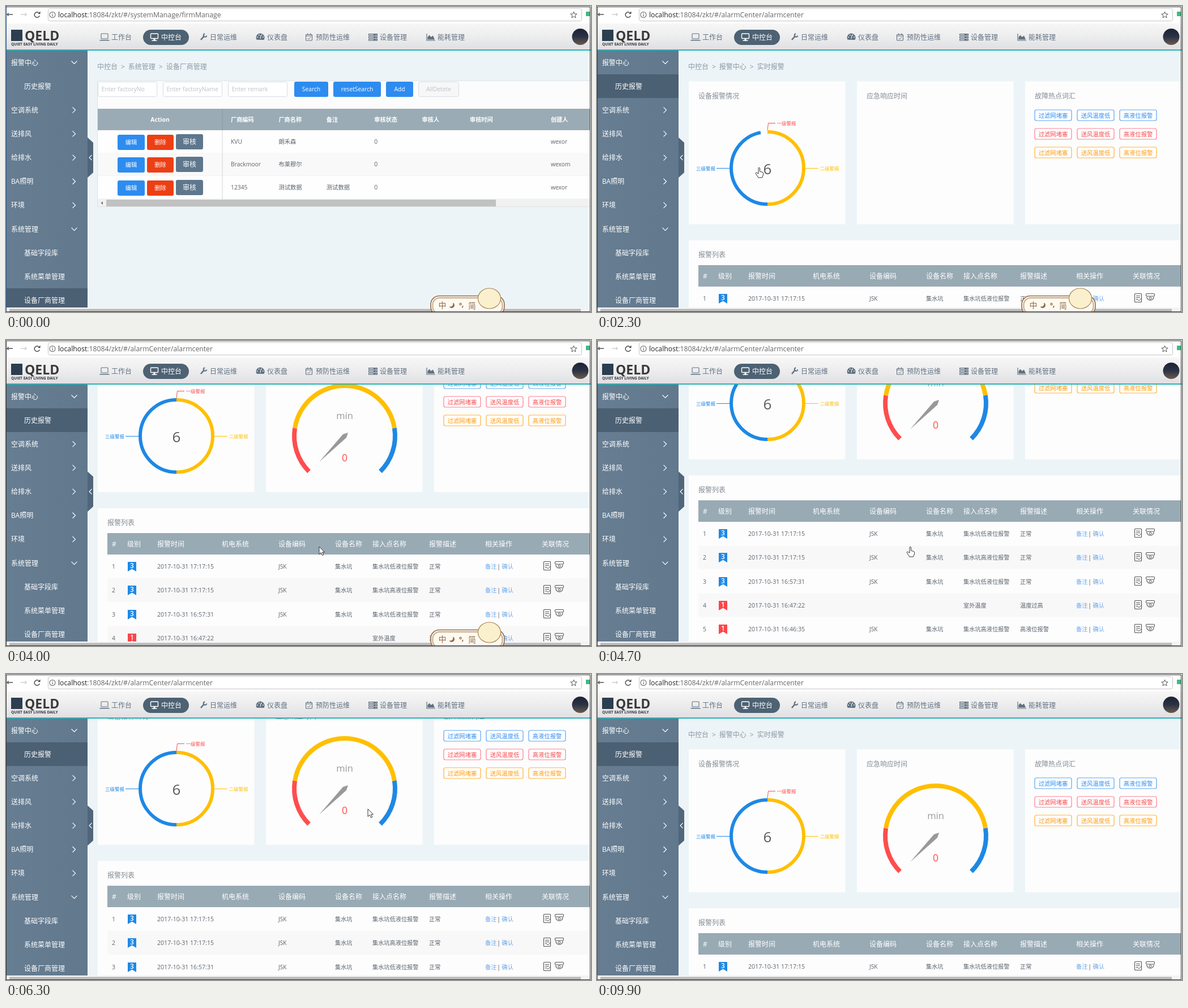
Animation, 1033 px wide and 542 px high, one loop 10 s. Source, as an HTML page with a canvas:

```html
<!DOCTYPE html>
<html lang="zh-CN">
<head>
<meta charset="utf-8">
<style>
html, body { margin: 0; width: 100%; height: 100%; overflow: hidden; background: #fff; }
canvas { display: block; width: 1033px; height: 542px; }
</style>
</head>
<body>
<canvas id="stage" width="1033" height="542"></canvas>
<script>
const c = document.getElementById('stage').getContext('2d');
const FONT = '"Open Sans","Noto Sans CJK SC","Noto Sans CJK",sans-serif';
const BLUE = '#2d8cf0', RED = '#ed3f14', SLATE = '#5f778d', GOLD = '#ffbf00', AZURE = '#1e88e5', ROSE = '#ff4d4f';
const INK = '#5b646e', SOFT = '#838b93', NAV = '#607080';
const LOOP = 10000;

// ---------- helpers ----------
// y is the visual middle of the line
function text(s, x, y, size, color, align = 'left', weight = 400) {
  c.font = `${weight} ${size}px ${FONT}`;
  c.textAlign = align;
  c.fillStyle = color;
  c.fillText(s, x, Math.round(y + size * .38));
}
function rect(x, y, w, h, color) {
  c.fillStyle = color;
  c.fillRect(x, y, w, h);
}
function round(x, y, w, h, r, fill, stroke, lw = 1) {
  c.beginPath();
  c.roundRect(x, y, w, h, r);
  if (fill) { c.fillStyle = fill; c.fill(); }
  if (stroke) { c.strokeStyle = stroke; c.lineWidth = lw; c.stroke(); }
}
function trace(p) {
  c.beginPath();
  for (let i = 0; i < p.length; i += 2) c.lineTo(p[i], p[i + 1]);
}
function line(color, lw, ...p) {
  trace(p);
  c.strokeStyle = color;
  c.lineWidth = lw;
  c.stroke();
}
function poly(fill, ...p) {
  trace(p);
  c.fillStyle = fill;
  c.fill();
}
function arc(x, y, r, a, b, color, lw) {
  c.beginPath();
  c.arc(x, y, r, a, b);
  c.strokeStyle = color;
  c.lineWidth = lw;
  c.stroke();
}
function disc(x, y, r, color) {
  c.beginPath();
  c.arc(x, y, r, 0, 7);
  c.fillStyle = color;
  c.fill();
}
// corner arrow: (dx, dy) points the way it opens towards
function chevron(x, y, dx, dy, color, lw) {
  line(color, lw, x - dx - dy, y - dy - dx, x, y, x - dx + dy, y - dy + dx);
}
function fade(x0, y0, x1, y1, ...colors) {
  const g = c.createLinearGradient(x0, y0, x1, y1);
  colors.forEach((k, i) => g.addColorStop(i / (colors.length - 1), k));
  return g;
}
const ramp = (t, a, b) => Math.max(0, Math.min(1, (t - a) / (b - a)));
const smooth = p => p * p * (3 - 2 * p);

// ---------- motion ----------
const NOTCH = 84.3;
// start, end, wheel notches
const scrolls = [[3690, 4180, 2], [4660, 4900, 1], [5060, 5300, 1], [5950, 6300, -3], [7050, 7400, -1]];
const scrollAt = t => Math.round(scrolls.reduce((s, [a, b, n]) => s + n * NOTCH * smooth(ramp(t, a, b)), 0));

// start, end, destination
const moves = [
  [100, 600, 40, 145], [1200, 1800, 335, 225], [1800, 2000, 286, 286], [2300, 2700, 511, 329],
  [3000, 3400, 553, 336], [3700, 4000, 553, 366], [5200, 5400, 549, 350], [6000, 6300, 639, 239],
  [6300, 6700, 60, 90], [6700, 7000, 300, 200], [7400, 7800, 154, 188], [7800, 8000, 420, 43],
  [8000, 8500, 800, 205], [8500, 8800, 978, 200], [8800, 9100, 940, 100]
];

function pointerAt(t) {
  let x = 845, y = 18;
  for (const [a, b, tx, ty] of moves) {
    const p = ramp(t, a, b);
    x += (tx - x) * p;
    y += (ty - y) * p;
  }
  return [Math.round(x), Math.round(y)];
}

function cursor(t) {
  if (t < 100 || t >= 9100) return;
  const [x, y] = pointerAt(t), top = scrollAt(t);
  const onMenu = x < 144 && y > 79;
  const onRing = t > 1900 && Math.hypot(x - 301, y + top - 287) < 67;
  const onRows = t > 1500 && x > 179 && y + top > 497;
  const hand = onMenu || onRing || onRows;
  c.save();
  c.translate(x, y);
  const shape = new Path2D(hand
    ? 'M-1 1Q0-1 1.5 1V7L5 8L7 9Q8 10 7.5 13L5.5 18H-1L-5 12Q-7 9-4.5 9L-1 11Z'
    : 'M0 0V13.5L3.2 10.6L5.5 15.5L7.8 14.5L5.6 9.8H9.5Z');
  c.fillStyle = '#fff';
  c.fill(shape);
  c.strokeStyle = '#333';
  c.lineWidth = 1;
  c.stroke(shape);
  c.restore();
}

// ---------- browser bar ----------
function browser(t) {
  rect(0, 0, 1033, 31, '#fff');
  line('#444', 1.4, 2, 15, 12, 15);
  chevron(2, 15, -2.5, 0, '#444', 1.4);
  line('#ccc', 1.4, 26, 15, 36, 15);
  chevron(36, 15, 2.5, 0, '#ccc', 1.4);
  arc(55, 15.5, 4.7, .4, 5.3, '#444', 1.5);
  poly('#444', 56, 14, 60.5, 14, 60.5, 9.5);
  round(74.5, 4.5, 942, 22, 3, '#fff', '#c4c4c4');
  arc(82, 15.5, 5, 0, 7, '#666', 1.1);
  rect(81.5, 14.5, 1.2, 4, '#666');
  rect(81.5, 12, 1.2, 1.3, '#666');
  text('localhost', 92, 15.5, 12.25, '#222');
  const w = c.measureText('localhost').width;
  text(':18084/zkt/#/' + (t < 800 ? 'systemManage/firmManage' : 'alarmCenter/alarmcenter'), 92 + w, 15.5, 12.25, '#666');
  const star = [];
  for (let i = 0; i <= 10; i++) {
    const r = i % 2 ? 2.6 : 6, a = i * Math.PI / 5 - Math.PI / 2;
    star.push(1002.5 + r * Math.cos(a), 16 + r * Math.sin(a));
  }
  line('#555', 1, ...star);
  rect(1024, 10, 8, 8, '#41b883');
}

// ---------- top navigation ----------
// each icon is drawn around its own centre
const icons = {
  laptop(k) { round(-6, -6, 12, 9, 1, null, k, 1.1); rect(-8.5, 5, 17, 1.5, k); },
  screen(k) { round(-6.5, -6, 13, 8.5, 1, null, k, 1.4); rect(-1.5, 3, 3, 3, k); rect(-4.5, 5.5, 9, 1.5, k); },
  wrench(k) { line(k, 2.6, -4, 5, 2, -2); arc(3.5, -3, 2.8, .1, 4.6, k, 2); },
  dial(k) {
    c.beginPath(); c.arc(0, 1, 7.5, 2.6, 6.83); c.fillStyle = k; c.fill();
    for (let a = 3.3; a < 6.2; a += .93) disc(5 * Math.cos(a), 1 + 5 * Math.sin(a), 1, '#eee');
    line('#eee', 1.2, 0, 3, 1, -3);
  },
  calendar(k) {
    round(-5.5, -4.5, 11, 10.5, 1, null, k, 1.1); rect(-5, -2.5, 10, 1, k);
    rect(-3, -6.5, 1.3, 3, k); rect(2, -6.5, 1.3, 3, k); line(k, 1, -2.5, 2, -.5, 4, 3, 0);
  },
  server(k) {
    for (let y = -6; y < 6; y += 4.5) { rect(-8, y, 16, 3.6, k); rect(-7, y + 1.2, 8, 1.2, '#eee'); disc(5.5, y + 1.8, .8, '#eee'); }
  },
  chart(k) { line(k, 1.2, -7, -6, -7, 6, 8, 6); poly(k, -5.5, 4.5, -5.5, 0, -2.5, -3.5, .5, 0, 4, -2.5, 7, 4.5); }
};
const nav = [['工作台', 186, 'laptop'], ['中控台', 274, 'screen'], ['日常运维', 360, 'wrench'], ['仪表盘', 461, 'dial'],
  ['预防性运维', 547, 'calendar'], ['设备管理', 660, 'server'], ['能耗管理', 762, 'chart']];

function header() {
  rect(0, 31, 1033, 46, fade(0, 31, 0, 77, '#f7f7f7', '#ededee', '#dfe0e4'));
  rect(0, 77, 1033, 2, '#27b3b8');
  rect(9, 42, 20, 20, '#2c3e50');
  text('QELD', 33, 52, 23, '#3a3a3a', 'left', 700);
  text('QUIET EASY LIVING DAILY', 9, 67, 6.6, '#333', 'left', 700);
  round(242, 42, 81, 27, 13.5, '#4d6273');
  nav.forEach(([s, x, icon], i) => {
    const color = i === 1 ? '#fff' : NAV;
    c.save();
    c.translate(x - 12, 55);
    icons[icon](color);
    c.restore();
    text(s, x, 55.5, 12, color);
  });
  disc(1014, 54.5, 14.5, fade(0, 40, 0, 69, '#1b2233', '#2c3346', '#6b5a4c'));
}

// ---------- sidebar ----------
// > closed group, v open group, blank for a page
const menu = ['v报警中心', ' 历史报警', '>空调系统', '>送排风', '>给排水', '>BA照明', '>环境', 'v系统管理', ' 基础字段库', ' 系统菜单管理', ' 设备厂商管理'];

function sidebar(t) {
  rect(1, 79, 143, 455, fade(1, 0, 144, 0, '#667d92', '#61788d'));
  if (t >= 800) rect(1, 121, 143, 42, '#4b6073');
  if (t < 1900) rect(1, 500, 143, 34, '#4b6073');
  menu.forEach((s, i) => {
    const y = 100 + i * 42.15;
    text(s.slice(1), s[0] === ' ' ? 32 : 9, y, 12, '#fff');
    if (s[0] === 'v') chevron(120.5, y + 2.5, 0, 5, '#fff', 1.2);
    if (s[0] === '>') chevron(122.5, y, 5, 0, '#fff', 1.2);
  });
  poly('#50667a', 144, 233, 154, 242, 154, 295, 144, 304);
  chevron(147, 268.5, -4.5, 0, '#fff', 1.1);
}

// ---------- pages ----------
function crumbs(a, b) {
  text(`中控台\u2002>\u2002${a}\u2002>\u2002${b}`, 161, 107, 12, '#8a98a3');
}

function button(s, x, y, w, color, size = 10.3, weight = 400) {
  round(x, y, w, 27, 3, color);
  text(s, x + w / 2, y + 13.2, size, '#fff', 'center', weight);
}

const firmCols = ['厂商编码', '厂商名称', '备注', '审核状态', '审核人', '审核时间'];
const firms = [['KVU', '朗禾森', '', '0', 'wexor'], ['Brackmoor', '布莱穆尔', '', '0', 'wexom'], ['12345', '测试数据', '测试数据', '0', 'wexor']];
const firmX = i => 397 + i * 84.4, MAKER_X = 962;

function firmPage() {
  crumbs('系统管理', '设备厂商管理');
  rect(161, 132, 871, 224, '#dfe3e6');
  rect(162, 133, 870, 49, '#fcfcfc');
  ['Enter factoryNo', 'Enter factoryName', 'Enter remark'].forEach((s, i) => {
    const x = 162.5 + i * 115;
    round(x, 134.5, 104, 26, 3, '#fff', '#d9dce1');
    text(s, x + 6, 147.5, 10.4, '#bcc1c8');
  });
  button('Search', 509, 134, 60, BLUE);
  button('resetSearch', 578, 134, 84, BLUE);
  button('Add', 671, 134, 48, BLUE);
  round(728.5, 134.5, 71, 26, 3, '#f7f7f7', '#d9dce1');
  text('AllDetete', 764, 147.5, 10.4, '#bdc2c9', 'center');

  rect(162, 182, 870, 38, '#9aabb5');
  text('Action', 272, 201.5, 10.4, '#fff', 'center', 700);
  firmCols.forEach((s, i) => text(s, firmX(i), 201.5, 10.2, '#fff', 'left', 700));
  text('创建人', MAKER_X, 201.5, 10.2, '#fff', 'left', 700);
  firms.forEach((f, i) => {
    const y = Math.round(220 + i * 40.4);
    rect(162, y, 870, 41, i % 2 ? '#f9f9f9' : '#fefefe');
    rect(162, y + 40, 870, 1, '#f1f3f4');
    button('编辑', 197, y + 8, 48, BLUE, 10.3, 500);
    button('删除', 249, y + 8, 47, RED, 10.3, 500);
    button('审核', 300, y + 7, 48, SLATE, 12);
    f.forEach((s, j) => text(s, j === 4 ? MAKER_X : firmX(j), y + 20.5, 10.3, INK));
  });
  rect(381, 182, 2, 160, 'rgba(90,100,110,.13)');
  rect(162, 342, 870, 13, '#f1f1f1');
  rect(177, 343, 688, 12, '#c1c1c1');
  poly('#777', 171, 346, 171, 352, 167.5, 349);
}

function ring(t) {
  const x = 301, y = 287, r = 64, top = -Math.PI / 2;
  const grow = 1 - Math.pow(1 - ramp(t, 1100, 2000), 3);
  const sweep = 2 * Math.PI * (t >= 3000 ? 1 : grow * .97);
  arc(x, y, r, top, top + Math.min(sweep, Math.PI), GOLD, 6);
  if (sweep > Math.PI) arc(x, y, r, top + Math.PI, top + sweep, AZURE, 6);
  line(ROSE, 1, x, 220, x + 1.5, 207.5, x + 14, 207.5);
  line(GOLD, 1, x + 67, 287.5, x + 90, 287.5);
  line(AZURE, 1, x - 90, 287.5, x - 67, 287.5);
  text('一级警报', x + 16.5, 207.5, 8.5, ROSE);
  text('二级警报', x + 92.5, 287.5, 8.5, GOLD);
  text('三级警报', x - 92, 287.5, 8.5, AZURE, 'right');
  text('6', x, 288, 26, '#5c5c5c', 'center');
}

function gauge() {
  const x = 598, y = 287, at = share => (.75 + 1.5 * share) * Math.PI;
  arc(x, y, 89, at(0), at(.2), ROSE, 8);
  arc(x, y, 89, at(.2), at(.8), GOLD, 8);
  arc(x, y, 89, at(.8), at(1), AZURE, 8);
  poly('#999', x - 45, y + 46, x - 3, y - 3, x + 6, y - 6, x + 3, y + 3);
  text('min', x, 251, 16.5, '#999', 'center');
  text('0', x, 325, 17.5, ROSE, 'center');
}

const tagTones = [[BLUE, '#5aa5f5'], ['#f5484a', '#ff7d93'], ['#ff9a0a', '#ffb13d']];
function tags() {
  tagTones.forEach(([ink, edge], i) => ['过滤网堵塞', '送风温度低', '高液位报警'].forEach((s, j) => {
    const x = 773 + j * 75, y = 184 + i * 33;
    round(x, y, 65, 19, 3, '#fff', edge, 1.2);
    text(s, x + 32.5, y + 10.5, 10.3, ink, 'center');
  }));
}

const alarmCols = [['#', 187], ['级别', 214], ['报警时间', 267], ['机电系统', 381], ['设备编码', 481], ['设备名称', 581],
  ['接入点名称', 647], ['报警描述', 747], ['相关操作', 846], ['关联情况', 946]];
const pit = ['JSK', '集水坑'], none = ['', ''];
const alarms = [
  [3, '17:17:15', ...pit, '集水坑低液位报警', '正常'],
  [3, '17:17:15', ...pit, '集水坑高液位报警', '正常'],
  [3, '16:57:31', ...pit, '集水坑低液位报警', '正常'],
  [1, '16:47:22', ...none, '室外温度', '温度过高'],
  [1, '16:46:35', ...pit, '集水坑高液位报警', '高液位报警'],
  [1, '16:46:35', ...none, '2#污水泵故障报警', '']
];

function alarmRow([level, time, ...cells], i, t) {
  const y = Math.round(497 + i * 42.3), m = y + 21;
  if (i % 2) rect(179, y, 853, 42, '#f8f8f8');
  text(String(i + 1), 187, m, 10.5, INK);
  poly(level === 3 ? AZURE : '#fb4649', 215, m - 8, 230, m - 8, 230, m + 9, 222.5, m + 4.5, 215, m + 9);
  text(String(level), 222.5, m - 1.5, 12, '#fff', 'center', 600);
  text('2017-10-31 ' + time, 267, m, 10.6, INK);
  cells.forEach((s, j) => text(s, alarmCols[j + 4][1], m, 10.2, INK));
  text('备注', 846, m, 10.2, '#6aa5ec');
  text('|', 870, m, 10.2, '#555', 'center');
  text('确认', 875.5, m, 10.2, '#6aa5ec');

  // note and camera
  round(949.5, m - 8.5, 12, 15, 1, null, '#555', 1.1);
  for (let d = -5; d <= 1; d += 3) rect(952, m + d, d < 1 ? 7 : 3, 1, '#555');
  line('#555', 1, 955, m + 2, 957, m + 4, 961, m);
  round(969.5, m - 8.5, 15, 4.5, 1.5, null, '#555', 1.1);
  arc(977, m - 3, 6.2, 0, Math.PI, '#555', 1.1);
  arc(977, m - .5, 2, 0, 7, '#555', 1);
  if (i === 4 && t >= 5300 && t < 6000) rect(179, y + 42, 853, 1, '#2b7f98');
}

function alarmPage(t) {
  crumbs('报警中心', '实时报警');
  ['设备报警情况', '应急响应时间', '故障热点词汇'].forEach((s, i) => {
    const x = 162 + i * 297;
    rect(x, 133.5, 276.5, 253, '#fdfdfd');
    text(s, x + 17, 159, 12, SOFT);
  });
  ring(t);
  if (t >= 3000) gauge();
  tags();
  rect(162, 415, 870, 480, '#fdfdfd');
  text('报警列表', 179, 440, 12, SOFT);
  rect(179, 459, 853, 38, '#98aab4');
  alarmCols.forEach(([s, x]) => text(s, x, 478.5, 12, '#fff'));
  alarms.forEach((a, i) => alarmRow(a, i, t));
  text('第1页 共1页 6条', 161, 802, 10.3, '#8d959c');
  chevron(968, 802.5, -3.5, 0, '#bbb', 1);
  disc(1001, 803, 8, '#1fc4da');
  text('1', 1001, 803, 9.5, '#fff', 'center');
}

function content(t) {
  c.save();
  c.beginPath();
  c.rect(144, 79, 888, 456);
  c.clip();
  rect(144, 79, 888, 456, '#edf4f7');
  const out = 1 - ramp(t, 800, 1100), into = ramp(t, 900, 1500);
  if (out > 0) {
    c.globalAlpha = out;
    firmPage();
  }
  if (into > 0) {
    c.globalAlpha = into;
    c.translate(0, -scrollAt(t));
    alarmPage(t);
  }
  c.restore();
}

// ---------- input method bar ----------
function inputBar() {
  const brown = '#8f6a4c';
  round(750, 513.5, 130, 34, 15, '#fffaf0', brown, 1.6);
  round(753.5, 517, 123, 28, 12, null, '#c9a98a', 2);
  text('中', 770.5, 530, 14, brown, 'center', 500);
  c.beginPath();
  c.arc(787, 530, 5, -.9, 2.5);
  c.arc(785, 528, 4.4, 1.9, -.5, true);
  c.fillStyle = brown;
  c.fill();
  arc(802.5, 528, 1.7, 0, 7, brown, 1.2);
  line(brown, 1.7, 807, 531, 805.5, 534.5);
  text('简', 823, 530.5, 13.5, brown, 'center', 500);
  c.beginPath();
  c.ellipse(853.5, 518, 20, 18, 0, 0, 7);
  c.fillStyle = '#fbf0cd';
  c.fill();
  c.strokeStyle = '#a98658';
  c.lineWidth = 1.2;
  c.stroke();
}

function draw(t) {
  rect(0, 0, 1033, 542, '#fff');
  content(t);
  browser(t);
  header();
  sidebar(t);
  rect(1, 534, 1031, 8, '#f4f4f4');
  rect(6, 536.5, 1009, 4.5, '#b9b9b9');
  if (t < 4400) inputBar();
  c.strokeStyle = '#333';
  c.lineWidth = 1;
  c.strokeRect(.5, 1.5, 1031, 540);
  if (t < 800 || t >= 9900) rect(0, 0, 1, 542, '#2c5585');
  cursor(t);
}

// the picture advances ten times a second
function frame(now) {
  draw(Math.floor(now % LOOP / 100) * 100);
  requestAnimationFrame(frame);
}
draw(0);
requestAnimationFrame(frame);
</script>
</body>
</html>
```
